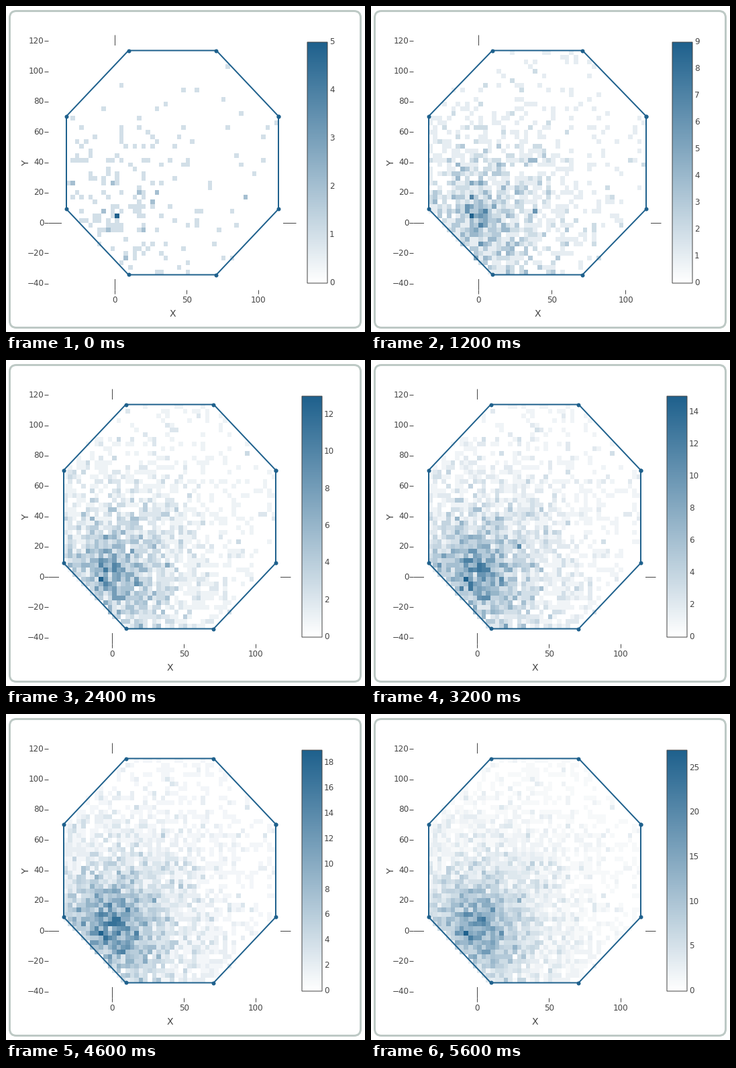
Recreate the animation shown at these times as a matplotlib script. Size 535 by 487 pixels, loop 6800 ms.

```python
import numpy as np
import matplotlib.pyplot as plt
from matplotlib.animation import FuncAnimation
from matplotlib.colors import LinearSegmentedColormap
from matplotlib.patches import FancyBboxPatch, Rectangle

W, H, DPI = 535, 487, 100
PX = 72 / DPI
STEPS, HOLD, INTERVAL = 29, 5, 200
BLUE, INK, CARD = "#1f618d", "#444444", "#bdc9c5"
CMAP = LinearSegmentedColormap.from_list("blues", ["white", BLUE])

# Octagon around (40, 40); 48 bins span it, plus one empty bin on each side
MID, RADIUS = 40, 80
APOTHEM = RADIUS * np.cos(np.pi / 8)
BIN = 2 * APOTHEM / 48
LOW, HIGH = MID - APOTHEM - BIN, MID + APOTHEM + BIN
NBINS = 50
PER_STEP = 185


def cell(x, y):
    return int((y - LOW) // BIN), int((x - LOW) // BIN)


def inside(x, y):
    dx, dy = abs(x - MID), abs(y - MID)
    return max(dx, dy) < APOTHEM and dx + dy < APOTHEM * np.sqrt(2)


def sample(rng):
    """Random point: exponential cloud near the zero point, thin uniform rest."""
    while True:
        if rng.random() < 0.08:
            x, y = rng.uniform(LOW, HIGH, 2)
        else:
            r, a = rng.gamma(2, 24), rng.uniform(0, 2 * np.pi)
            x, y = 1 + r * np.cos(a), 3 + r * np.sin(a)
        if inside(x, y):
            return cell(x, y)


def peak(s):
    """Highest count: steady growth, faster over the last steps."""
    return round(5 + 0.63 * s + 0.9 * max(0, s - 23))


def leader(s):
    """The cell that holds the highest count."""
    if s == 0:
        return cell(1.5, 4.5)
    return cell(-4.5, 4.5) if s < 10 else cell(-8, -2)


def build():
    rng = np.random.default_rng(12)
    grid = np.zeros((NBINS, NBINS), int)
    steps = []
    for s in range(STEPS):
        top = peak(s)
        grid[leader(s)] = top
        added = 0
        while added < PER_STEP:
            c = sample(rng)
            if grid[c] < top - 2:
                grid[c] += 1
                added += 1
        steps.append((grid.copy(), top))
    return steps


DATA = build()

fig = plt.figure(figsize=(W / DPI, H / DPI), dpi=DPI, facecolor="white")
ax = fig.add_axes([0, 0, 1, 1])


def y_px(v):
    return 234 - (v - MID) * 335 / (2 * APOTHEM)


def line(xs, ys, color=INK, width=1, **kw):
    ax.plot(xs, ys, color=color, lw=width * PX, snap=False, **kw)


def label(x, y, text, size=12, ha="center", **kw):
    ax.text(x, y, text, size=size * PX, color=INK, ha=ha, va="center",
            family="DejaVu Sans", **kw)


def draw_axes(x_px, right):
    centre = (64 + right) / 2
    line([round(x_px(0)) + 0.5] * 2, [44, 424], zorder=1)
    line([64, right], [324.5] * 2, zorder=1)
    for v in range(-40, 121, 20):
        y = y_px(v)
        line([58, 63], [np.floor(y) + 0.5] * 2)
        label(56.5, y - 0.4, str(v).replace("-", "\u2212"), ha="right")
    for v in (0, 50, 100):
        line([np.floor(x_px(v)) + 0.5] * 2, [425, 430])
        label(x_px(v), 439.7, str(v))
    label(centre, 460.2, "X", 14)
    label(29.8, 234, "Y", 14, rotation=90)


def draw_bar(left, top):
    ax.imshow(np.linspace(0, 1, 256)[:, None], cmap=CMAP, origin="lower",
              extent=(left, left + 30, 414, 54), aspect="auto", zorder=2)
    ax.add_patch(Rectangle((left, 54), 30, 360, fill=False, ec=INK,
                           lw=PX, snap=False, zorder=3))
    step = 1 if top < 10 else 2 if top < 20 else 5
    for v in range(0, top + 1, step):
        label(left + 33, 413.6 - 360 * v / top, str(v), ha="left")


def draw(n):
    s = min(n, STEPS - 1)
    grid, top = DATA[s]
    wide = top < 10
    right = 432 if wide else 424
    pad = 26 if s == 0 else 22
    scale = (right - 64 - 2 * pad) / (2 * APOTHEM)

    def x_px(v):
        return (64 + right) / 2 + (v - MID) * scale

    ax.clear()
    ax.set_axis_off()
    ax.add_patch(FancyBboxPatch((5.5, 7.5), 523, 473, fc="white", ec=CARD,
                                boxstyle="round,pad=0,rounding_size=10",
                                lw=3 * PX, zorder=0))
    draw_axes(x_px, right)
    ax.imshow(grid, cmap=CMAP, vmin=0, vmax=top, origin="lower",
              interpolation="nearest", aspect="auto", zorder=2,
              extent=(x_px(LOW), x_px(HIGH), y_px(LOW), y_px(HIGH)))
    a = np.pi / 8 + np.arange(9) * np.pi / 4
    line(x_px(MID + RADIUS * np.cos(a)), y_px(MID + RADIUS * np.sin(a)),
         BLUE, 2, marker="o", ms=6 * PX, mew=0, zorder=4)
    draw_bar(449 if wide else 441, top)
    ax.set_xlim(0, W)
    ax.set_ylim(H, 0)
    return []


anim = FuncAnimation(fig, draw, frames=STEPS + HOLD, init_func=lambda: [],
                     interval=INTERVAL, repeat=True, repeat_delay=0)
plt.show()
```
